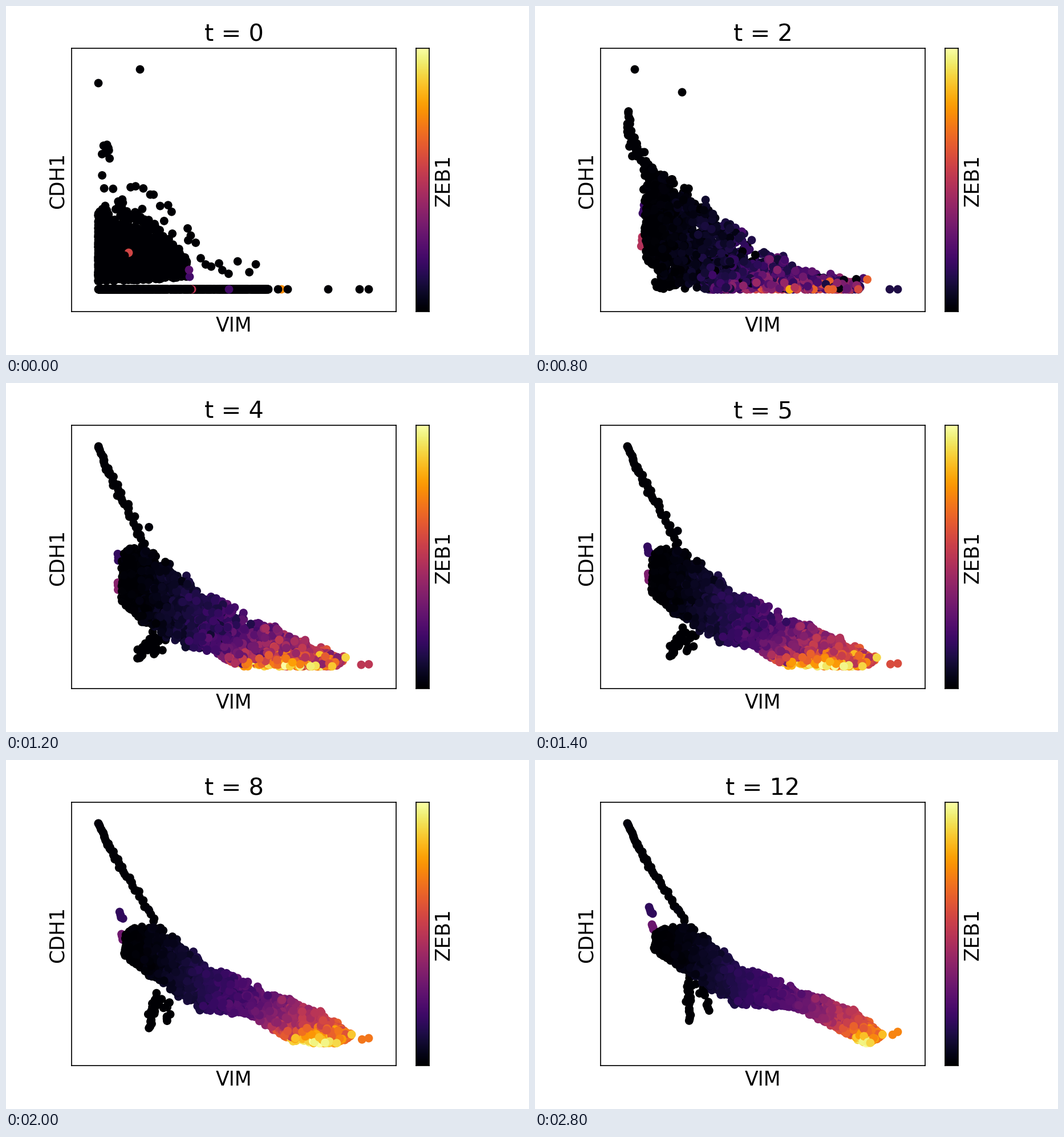
Write a matplotlib script that moves like this. It is 917 by 611 pixels and loops after 3000 ms.

```python
import numpy as np
import matplotlib.pyplot as plt
from matplotlib.animation import FuncAnimation

W, H, DPI = 917, 611, 128
PT = 72 / DPI                      # points per pixel
X0, X1, Y0, Y1 = 115, 684.2, 73.8, 535
FLOOR = 496
N_BODY = 2000
rng = np.random.default_rng(7)

# Upper and lower outline of the body, left to right, early and late.
UPPER = np.array([[(195, 272), (238, 303), (312, 363), (397, 425), (488, 468), (578, 489)],
                  [(214, 296), (275, 292), (350, 355), (467, 405), (560, 438), (612, 482)]])
LOWER = np.array([[(196, 442), (228, 474), (293, 485), (308, 496), (320, 496), (560, 496)],
                  [(208, 331), (262, 368), (352, 426), (463, 434), (565, 488), (585, 495)]])

# Cells that start out on top of the cloud: x, y, shade.
SPOTS = np.array([(483, 496, .75), (477, 496, 0), (494, 496, 0), (565, 496, 0),
                  (326, 496, .5), (323, 496, 0), (391, 496, .2),
                  (322, 474, .2), (321, 462, .25),
                  (215, 432, .56), (208, 437, 0)])


def early_part(t):
    """Share of the early pose, 1 at t = 2 and 0 at t = 12."""
    return 1 - np.log(t / 2) / np.log(6)


def along(points, w):
    """Places at fraction w of a polyline."""
    points = np.asarray(points, float)
    k = np.linspace(0, 1, len(points))
    return np.column_stack([np.interp(w, k, points[:, i]) for i in (0, 1)])


def cloud(n):
    """Start places in the dense cloud at the left."""
    x = 162 + 156 * rng.random(n) ** 1.3
    x[rng.random(n) < .06] = 162
    top = np.interp(x, [162, 205, 260, 318], [338, 320, 366, 440])
    base = 482 - 8 * ((x - 162) / 156) ** 2
    return np.column_stack([x, top + (base - top) * rng.random(n) ** .5])


class Strand:
    """A thin string of cells moving from an early to a late path."""

    def __init__(self, n, early, late, power, jitter=0., shades=(0, 0), start=None):
        self.w = np.linspace(0, 1, n)
        self.early, self.late = along(early, self.w), along(late, self.w)
        self.power = np.interp(self.w, [0, 1], power)
        self.jitter = rng.normal(0, jitter, (n, 2)) * (.3 + self.w[:, None])
        self.shades = shades
        self.start = cloud(n) if start is None else np.array(start, float)

    def at(self, t):
        f = early_part(t)
        mix = (f ** self.power)[:, None]
        places = self.late + (self.early - self.late) * mix
        a, b = self.shades
        return places + self.jitter * (.2 + 2.4 / t), np.full(len(mix), b + (a - b) * f ** 2)


strands = [
    Strand(46, [(164, 184), (172, 250), (200, 285)],
           [(162, 111), (195, 178), (262, 280)], (8, 2), 4.5, (.01, .01)),
    Strand(26, [(216, 494), (250, 478)], [(271, 457), (270, 382)], (.7, .7), 6),
    Strand(9, [(240, 490), (270, 470)], [(305, 439), (290, 394)], (.7, .7), 9),
    Strand(4, [(188, 404), (188, 419)], [(205, 288), (208, 296)], (1.3, 1.3), 1, (.48, .3)),
    Strand(4, [(191, 350), (193, 365)], [(200, 258), (206, 270)], (1.6, 1.6), 2, (.18, .16)),
    Strand(2, [(175, 111), (258, 151)], [(162, 111), (250, 262)], (8, 5), 0, (0, .02),
           [(235, 111), (162, 135)]),
    Strand(2, [(622, 496), (636, 496)], [(627, 481), (636, 476)], (.4, .4), 0, (.12, .73),
           [(620, 496), (636, 496)]),
]

u = rng.random(N_BODY)
v = rng.beta(1.25, 1, N_BODY)

# Start: a cloud, a row on the floor, a wisp above and a loose outer arc.
start = cloud(N_BODY)
row = rng.random(N_BODY) < .15 + .7 * u
start[row, 0] = 162 + 298 * rng.random(row.sum()) ** 1.15
start[row, 1] = FLOOR
wisp, arc = slice(0, 8), slice(8, 34)
start[wisp] = rng.normal((179, 252), (7, 20), (8, 2))
start[arc] = along([(172, 300), (255, 318), (310, 385), (345, 450), (430, 450)],
                   np.linspace(0, 1, 26)) + rng.normal(0, 9, (26, 2))
start[-len(SPOTS):] = SPOTS[:, :2]
for part in (wisp, arc, slice(-len(SPOTS), None)):
    u[part] = np.clip((start[part, 0] - 162) / 330, 0, 1)

start = np.vstack([s.start for s in strands] + [start])
start_shade = np.zeros(len(start))
start_shade[-len(SPOTS):] = SPOTS[:, 2]

jitter = rng.normal(size=(N_BODY, 2))
hue = rng.normal(size=N_BODY)
stray = np.where(rng.random(N_BODY) < .012, rng.exponential(.3, N_BODY), 0)


def body_at(t):
    f = early_part(t)
    mix = (f ** (1.6 - .9 * u * v))[:, None]
    up, low = ((1 - mix) * along(p[1], u) + mix * along(p[0], u) for p in (UPPER, LOWER))
    places = up + (low - up) * (v - stray * f)[:, None] + jitter * (1 + 8 / t)

    shade = .75 * u ** 1.9 + .42 * v ** 2 * np.exp(-((u - .85) / .12) ** 2)
    shade = shade * (1 - .55 * f ** 2.5)
    shade = shade + hue * (shade * (.05 + .35 * f ** 2) + .008)
    return places, shade


def pose(t):
    if t == 0:
        return start, start_shade
    parts = [s.at(max(t, 2)) for s in strands] + [body_at(max(t, 2))]
    places = np.clip(np.vstack([p for p, _ in parts]), (162, 111), (636, FLOOR))
    shades = np.clip(np.concatenate([c for _, c in parts]), 0, 1)
    if t == 1:
        return .27 * start + .73 * places, .25 * start_shade + .65 * shades
    return places, shades


def box(x0, y0, x1, y1):
    ax = fig.add_axes([x0 / W, 1 - y1 / H, (x1 - x0) / W, (y1 - y0) / H])
    ax.set(xticks=[], yticks=[])
    for side in ax.spines.values():
        side.set_linewidth(1.7 * PT)
    return ax


def label(x, y, text, size, angle=0):
    return fig.text(x / W, 1 - y / H, text, fontsize=size * PT, rotation=angle,
                    ha="center", va="baseline", rotation_mode="anchor")


plt.rcParams["font.family"] = "DejaVu Sans"
fig = plt.figure(figsize=(W / DPI, H / DPI), dpi=DPI, facecolor="white")
ax = box(X0, Y0, X1, Y1)
dots = ax.scatter(*start.T, c=start_shade, s=(14.8 * PT) ** 2, cmap="inferno",
                  vmin=0, vmax=1, linewidths=0)
ax.set(xlim=(X0, X1), ylim=(Y1, Y0))

bar = box(719, Y0, 742, Y1)
bar.imshow(np.linspace(0, 1, 256)[:, None], cmap="inferno", origin="lower",
           aspect="auto")

title = label(399.6, 61, "t = 0", 41.47)
label(399.6, 570, "VIM", 34.56)
label(101, 305.6, "CDH1", 34.56, 90)
label(777.6, 305.6, "ZEB1", 34.56, 90)


def draw(k):
    t = max(0, k - 2)              # the start is held for three ticks
    places, shades = pose(t)
    dots.set_offsets(places)
    dots.set_array(shades)
    title.set_text(f"t = {t}")
    return dots, title


anim = FuncAnimation(fig, draw, frames=15, interval=200, repeat=True,
                     repeat_delay=0, blit=False)
plt.show()
```
